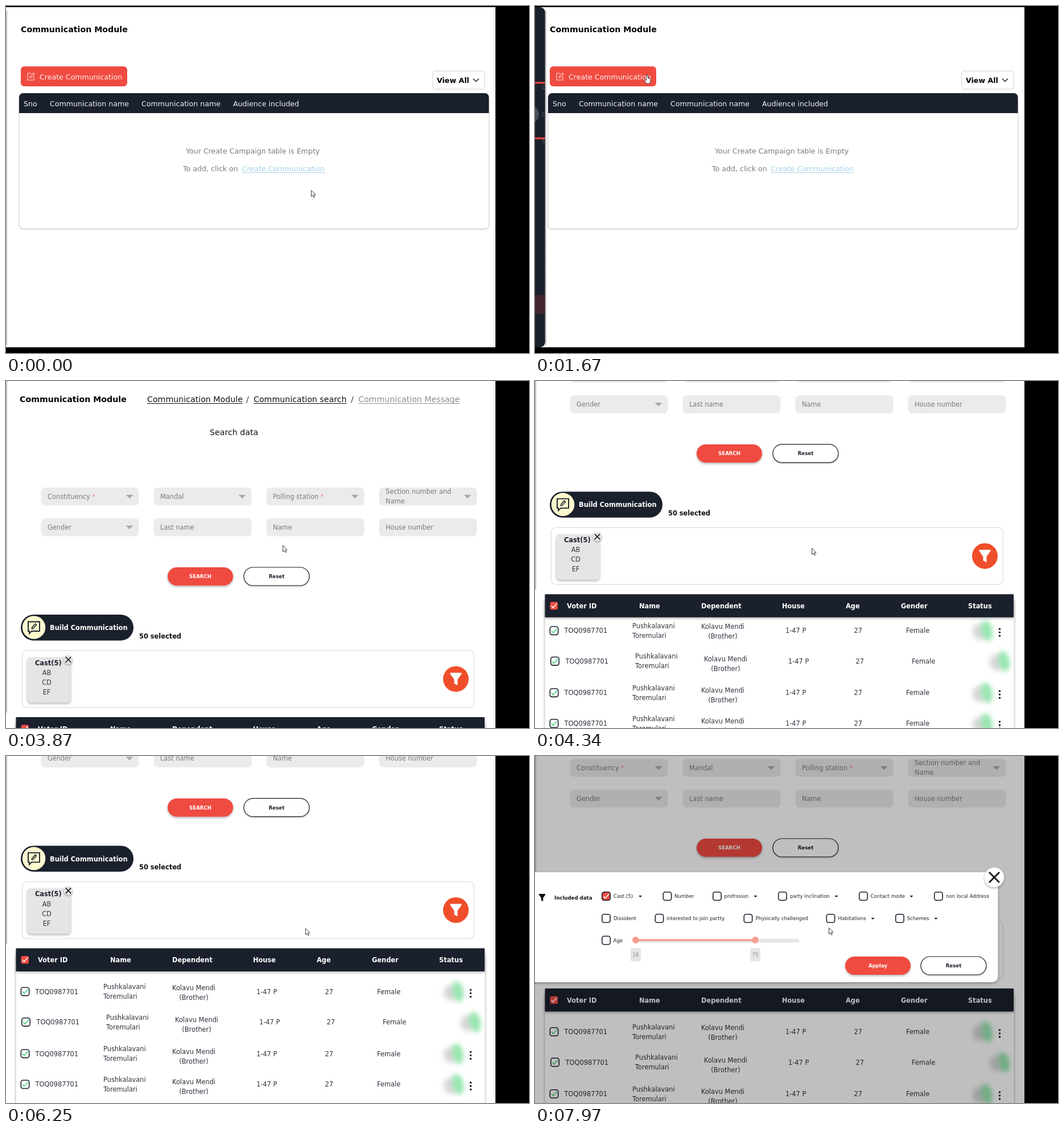
Recreate the animation shown at these times as an HTML page with a canvas. Size 919 by 609 pixels, loop 8 s.

```html
<!DOCTYPE html>
<html lang="en">
<head>
<meta charset="utf-8">
<title>Communication Module</title>
<style>
html, body { margin: 0; width: 100%; height: 100%; overflow: hidden; background: #000; }
canvas { display: block; }
</style>
</head>
<body>
<canvas id="stage" width="919" height="609"></canvas>
<script>
const ctx = document.getElementById('stage').getContext('2d');
const LOOP = 8000, PAGE_W = 860;
const NAVY = '#1a202c', RED = '#f04b41', GRAY = '#7b7b7b', FIELD = '#ebebeb';

// Piecewise linear value: rows of [time, a, b, ...]
function track(keys, t) {
  const i = keys.findIndex(k => k[0] > t);
  if (i === 0) return keys[0].slice(1);
  if (i < 0) return keys[keys.length - 1].slice(1);
  const a = keys[i - 1], b = keys[i], p = (t - a[0]) / (b[0] - a[0]);
  return a.slice(1).map((v, n) => v + (b[n + 1] - v) * p);
}

const sidebarKeys = [[679, 0], [680, 12], [760, 72], [900, 130], [1050, 152], [1200, 159],
  [1509, 159], [1590, 70], [1670, 18], [1750, 6], [1910, 0]];
const scrollKeys = [[4029, 0], [4030, 60], [4269, 60], [4270, 130], [4340, 215], [4560, 400],
  [4780, 540], [5040, 611], [5859, 611], [6000, 470], [6250, 253], [6400, 196], [6500, 182]];
const cursorKeys = [[0, 536, 323], [339, 536, 323], [340, 416, 470], [679, 416, 470],
  [680, 60, 300], [1000, 120, 230], [1430, 150, 180], [1510, 150, 180], [1670, 197, 121],
  [1910, 195, 122], [2729, 195, 122], [2730, 193, 122], [3049, 193, 122], [3050, 188, 122],
  [3390, 188, 122], [3540, 486, 285], [3690, 485, 287], [3870, 486, 288], [4270, 486, 288],
  [4340, 486, 293], [4700, 486, 293], [5040, 467, 372], [5120, 467, 374], [5380, 467, 375],
  [5700, 467, 376], [5860, 467, 376], [6250, 525, 302], [6640, 848, 354], [6710, 848, 354],
  [6950, 770, 360], [7190, 788, 357], [7400, 788, 357], [7800, 525, 304], [7970, 516, 301]];
const modalKeys = [[7340, 0], [7420, .4], [7520, .75], [7640, .95], [7760, 1]];

// y is the middle of the capitals
function text(s, x, y, size, color = '#000', style = '', align = 'left') {
  ctx.font = `${style} ${size}px "DejaVu Sans", Verdana, sans-serif`;
  ctx.textAlign = align;
  ctx.fillStyle = color;
  ctx.fillText(s, x, y + size * .365);
  return ctx.measureText(s).width;
}
function underlined(s, x, y, size, color, style) {
  const w = text(s, x, y, size, color, style);
  ctx.fillRect(x, Math.round(y + size * .5), w, 1);
}
const bold = (s, x, y, size, color, align) => text(s, x, y, size, color, 'bold', align);

function box(x, y, w, h, r, fill, stroke, lw = 1, shadow = 0) {
  ctx.save();
  ctx.beginPath();
  ctx.roundRect(x, y, w, h, r);
  if (shadow) {
    ctx.shadowColor = 'rgba(0,0,0,.3)';
    ctx.shadowBlur = shadow;
    ctx.shadowOffsetY = shadow / 2;
  }
  if (fill) { ctx.fillStyle = fill; ctx.fill(); }
  ctx.shadowColor = 'transparent';
  if (stroke) { ctx.strokeStyle = stroke; ctx.lineWidth = lw; ctx.stroke(); }
  ctx.restore();
}
const disc = (x, y, r, fill, stroke, lw, shadow) =>
  box(x - r, y - r, 2 * r, 2 * r, r, fill, stroke, lw, shadow);

function poly(x, y, pts, color, lw = 0) {
  ctx.beginPath();
  for (let i = 0; i < pts.length; i += 2) ctx.lineTo(x + pts[i], y + pts[i + 1]);
  if (lw) {
    ctx.strokeStyle = color; ctx.lineWidth = lw; ctx.stroke();
  } else {
    ctx.closePath(); ctx.fillStyle = color; ctx.fill();
  }
}
const triangle = (x, y, r, color) => poly(x, y, [-r, -r / 2, r, -r / 2, 0, r / 2], color);
function cross(x, y, r, lw) {
  poly(x, y, [-r, -r, r, r], '#111', lw);
  poly(x, y, [-r, r, r, -r], '#111', lw);
}
const funnel = (x, y, k, color) =>
  poly(x, y, [-10 * k, -11 * k, 10 * k, -11 * k, 10 * k, -9 * k, 3 * k, 1 * k,
    3 * k, 11 * k, -3 * k, 8 * k, -3 * k, 1 * k, -10 * k, -9 * k], color);
const tick = (x, y, color) => poly(x, y, [-4.5, 0, -1.5, 3.5, 5, -4], color, 1.6);

function checkbox(x, y, mark) {
  box(x - 7.2, y - 7.2, 14.4, 14.4, 3.5, mark === 'red' ? RED : '#fff', NAVY, 1.6);
  if (mark) tick(x, y, mark === 'red' ? '#fff' : '#45d67b');
}
function pill(label, x, y, filled) {
  box(x, y, 115, 32, 16, filled ? RED : '#fff', filled ? null : NAVY, 1.2, filled ? 4 : 3);
  bold(label, x + 57.5, y + 16, 8.6, filled ? '#fff' : NAVY, 'center');
}

function edgeShadow(x, top, bottom) {
  const g = ctx.createLinearGradient(x, 0, x + 4, 0);
  g.addColorStop(0, '#a2a2a2');
  g.addColorStop(1, 'rgba(230,230,230,0)');
  ctx.fillStyle = g;
  ctx.fillRect(x, top, 4, bottom - top);
}

function homePage(sidebar) {
  ctx.fillStyle = '#fff';
  ctx.fillRect(0, 2, PAGE_W, 597);
  bold('Communication Module', 26, 41, 14.2);

  box(26, 106, 187, 35, 6, RED);
  poly(37, 117, [7, 1, 1, 1, 1, 13, 12, 13, 12, 7], '#ffd9d5', 1.1);
  poly(37, 117, [5, 9, 5.5, 6.5, 11, .5, 13, 2.5, 7.5, 8.5, 5, 9], '#ffd9d5', 1.1);
  text('Create Communication', 59, 124, 12.6, '#ffeceb');

  box(750, 114, 91, 32, 4, '#fff', '#dedede', 1.3);
  bold('View All', 757, 130, 12.6);
  poly(826, 130, [-5, -2.5, 0, 2.5, 5, -2.5], '#222', 1.5);

  box(23, 153.5, 825.5, 237.5, 7, '#fff', '#dcdcdc', 1.3, 2);
  box(23, 153, 825.5, 35, [7, 7, 0, 0], NAVY);
  ['Sno', 'Communication name', 'Communication name', 'Audience included']
    .forEach((s, i) => text(s, [31, 77, 238, 399][i], 171, 12.6, '#f2f2f2'));
  text('Your Create Campaign table is Empty', 316, 254, 12.6, GRAY);
  text('To add, click on', 311, 285.5, 12.6, GRAY);
  underlined('Create Communication', 414.5, 285.5, 12.6, '#a3d0e4', 'italic');

  if (sidebar > 0) drawSidebar(sidebar);
  edgeShadow(sidebar, 8, 595);
}

function drawSidebar(w) {
  const shift = (w - 18) * .25;
  box(-20, 2, w + 20, 597, 9, NAVY);
  ctx.save();
  ctx.beginPath();
  ctx.rect(0, 2, w, 597);
  ctx.clip();
  ctx.fillStyle = '#432630';
  ctx.fillRect(0, 507, w, 34);
  ctx.fillStyle = '#d8443e';
  ctx.fillRect(0, 133, w, 3.5);
  ctx.fillRect(0, 230.5, w, 3.5);
  disc(-9 + shift, 190, 16, '#4a4f59');
  ['Dashboard', 'Data', 'Search'].forEach((s, i) =>
    text(s, 12 + shift, 143 + 47.5 * i, 9.5, '#555b66'));
  ctx.restore();
}

function field(label, x, y, arrow, required) {
  box(x, y, 172, 31.5, 7, FIELD);
  if (Array.isArray(label)) {
    label.forEach((s, i) => text(s, x + 11.5, y + 7 + 17 * i, 11.4, GRAY));
  } else {
    const w = text(label, x + 11.5, y + 15.5, 11.4, GRAY);
    if (required) text('*', x + 15 + w, y + 15.5, 11.4, '#f08a84');
  }
  if (arrow) triangle(x + 155.5, y + 16, 6.5, '#a9a9a9');
}

function searchForm() {
  bold('Communication Module', 24, 31.5, 14.2);
  underlined('Communication Module', 248, 31.5, 14.2, '#111');
  text('/', 422, 31.5, 14.2, '#333');
  underlined('Communication search', 435, 31.5, 14.2, '#111');
  text('/', 606, 31.5, 14.2, '#333');
  underlined('Communication Message', 619, 31.5, 14.2, '#8c8c8c');
  text('Search data', 358, 90, 14.2, '#111');

  const x = i => 61.5 + 198 * i;
  field('Constituency', x(0), 187, true, true);
  field('Mandal', x(1), 187, true);
  field('Polling station', x(2), 187, true, true);
  field(['Section number and', 'Name'], x(3), 187, true);
  ['Gender', 'Last name', 'Name', 'House number']
    .forEach((s, i) => field(s, x(i), 241, i === 0));
  pill('SEARCH', 284, 327, true);
  pill('Reset', 418, 327, false);

  box(26, 410, 198, 45.5, 22.5, NAVY);
  disc(49, 432.5, 20.3, '#fff9cf');
  poly(49, 432, [-10, -9.5, 10, -9.5, 10, 7, -4, 7, -8, 11, -8, 7, -10, 7, -10, -10.4], NAVY, 1.9);
  poly(49, 431, [-4, 4, -3, 1, 2.5, -5, 4.5, -3, -1, 3, -4, 4], NAVY, 1.5);
  bold('Build Communication', 77, 433, 11.4, '#fff');
  bold('50 selected', 234, 447.5, 11.4, '#111');

  box(28.5, 473, 794, 100, 8, '#fff', '#e3e3e3', 1.5);
  box(37.5, 485, 76, 79.5, 6, '#e5e5e5', null, 1, 4);
  bold('Cast(5)', 51, 494.5, 11.4, NAVY);
  ['AB', 'CD', 'EF'].forEach((s, i) => text(s, 71.5, 512 + 17 * i, 11.4, '#333a45', '', 'center'));
  disc(109.5, 489, 8, '#e4e4e4', null, 1, 3);
  cross(109.5, 489, 4.7, 1.6);
  disc(790.5, 523, 22.5, '#f04e2a');
  funnel(790.5, 523, 1, '#fff');
}

function status(x, y) {
  ctx.save();
  ctx.filter = 'blur(5px)';
  ctx.beginPath();
  ctx.ellipse(x - 3, y + 2, 13, 14, 0, 0, 7);
  ctx.fillStyle = '#d6d6d6';
  ctx.fill();
  ctx.filter = 'blur(4px)';
  ctx.beginPath();
  ctx.ellipse(x + 9, y, 9.5, 18, -.2, 0, 7);
  ctx.fillStyle = '#98e6b0';
  ctx.fill();
  ctx.restore();
}

function voterRow(i, y) {
  const odd = i === 1, ink = '#2d333d', dx = odd ? 5 : 0;
  const cell = (s, x, cy, align) => text(s, x, cy, 11.4, ink, '', align);
  checkbox(odd ? 35 : 33.5, y, 'green');
  cell('TOQ0987701', odd ? 53.5 : 51.5, y);
  cell('Pushkalavani', 171 + dx, y - 8.5);
  cell('Toremulari', 171 + dx, y + 8.5);
  if (i < 5) {
    const top = y - (i ? 4 : 7);
    cell('Kolavu Mendi', 330 + dx, top, 'center');
    cell('(Brother)', 330 + dx, top + 17, 'center');
  } else {
    cell('Kolavu Mendi', 330, y, 'center');
  }
  cell('1-47 P', 440 + dx, y);
  cell('27', odd ? 563.5 : 560.5, y);
  cell('Female', odd ? 662 : 652, y);
  status(odd ? 815 : 785, y);
  if (!odd) for (const d of [-3, 3, 9]) disc(816.5, y + d, 1.7, '#111');
}

function pager(y) {
  text('Items per page', 34, y, 11.5, '#2d333d');
  box(129, y - 15.5, 74, 31, 6, FIELD);
  text('50', 140, y, 11.5, '#222');
  triangle(187.5, y, 6.5, '#999');
  const chevron = (x, d) => poly(x, y, [3 * d, -6, -3 * d, 0, 3 * d, 6], '#111', 1.8);
  chevron(334.5, 1); chevron(340, 1); chevron(359.5, 1);
  chevron(497.5, -1); chevron(517, -1); chevron(522.5, -1);
  for (let i = 0; i < 5; i++) {
    const x = 382.5 + 23 * i;
    disc(x, y, i ? 9 : 8, i ? '#fff' : NAVY, i ? '#dedede' : null);
    text(i + 1, x, y, 8.6, i ? '#333' : '#fff', '', 'center');
  }
  const w = text('1 – 22 of 22 ', 661, y, 8.4, '#333');
  text('viewing', 661 + w, y, 8.4, '#333', 'italic');
}

function voterTable(scroll, inner) {
  box(17, 600, 825, 562, 2, '#fff', '#d4d4d4', 1, 4);
  ctx.save();
  ctx.beginPath();
  ctx.rect(17, 630, 825, 490);
  ctx.clip();
  for (let i = 0; i < 9; i++) {
    const y = 666 - inner + (i < 2 ? 53.5 * i : 109 + 53.85 * (i - 2));
    if (y > scroll - 40 && y < scroll + 650) voterRow(i, y);
  }
  ctx.restore();
  pager(1142.5);
  box(17.5, 590, 823.5, 40.5, 1, NAVY, null, 1, 4);
  box(26.5, 603.5, 13.5, 13.5, 2.5, RED);
  tick(33.2, 610.3, '#fff');
  ['Voter ID', 'Name', 'Dependent', 'House', 'Age', 'Gender', 'Status'].forEach((s, i) =>
    bold(s, [56, 183, 292, 434, 546, 643, 761][i], 610.5, 11.4, '#fff'));
}

function searchPage(t) {
  const [scroll] = track(scrollKeys, t);
  const inner = t >= 4030 && t < 6000 ? 12 : 0;
  ctx.fillStyle = '#fff';
  ctx.fillRect(0, 0, PAGE_W, 609);
  ctx.save();
  ctx.translate(0, -scroll);
  searchForm();
  voterTable(scroll, inner);
  edgeShadow(0, 0, 582);
  ctx.restore();
}

function option(label, x, y, labelX, arrowX, mark) {
  checkbox(x, y, mark);
  text(label, labelX, y, 8.6, '#222');
  if (arrowX) triangle(arrowX, y + .5, 3, '#111');
}

function filterModal(p) {
  ctx.fillStyle = `rgba(0,0,0,${.25 * p})`;
  ctx.fillRect(0, 0, PAGE_W, 609);
  ctx.save();
  ctx.translate((p - 1) * 830, 0);
  box(-20, 204, 833.5, 193, 10, '#fff', null, 1, 4);
  disc(807, 213, 17.3, '#fff', null, 1, 4);
  cross(807, 213, 9, 2.6);
  funnel(12.5, 248.5, .58, '#111');
  bold('Included data', 34, 248.5, 8.6, '#111');

  option('Cast (5)', 125, 246, 138, 185, 'red');
  option('Number', 232.5, 246, 245);
  option('profrssion', 320, 246, 332.5, 387.5);
  option('party inclination', 435, 246, 448, 529.5);
  option('Contact mode', 577, 246, 589.5, 661.5);
  option('non local Address', 709, 246, 722);
  option('Dissident', 125, 285, 138);
  option('interested to join partty', 218.5, 285, 231);
  option('Physically challenged', 374.5, 285, 387.5);
  option('Habitations', 519.5, 285, 532.5, 593.5);
  option('Schemes', 641, 285, 653.5, 704.5);
  option('Age', 125, 323.5, 137.5);

  box(177, 321, 287, 6.5, 2, '#e6e6e6');
  box(177, 321.5, 210, 3.6, 1, '#f9a195');
  [[177, '18'], [387, '75']].forEach(([x, s]) => {
    disc(x, 323, 6, '#f9a092');
    box(x - 9, 337, 18, 23.5, 3, '#e6e6e6');
    text(s, x, 349, 8.6, '#8a8a8a', '', 'center');
  });
  pill('Applay', 545, 352, true);
  pill('Reset', 678, 352, false);
  ctx.restore();
}

function pointer(t) {
  if (t >= 410 && t < 680) return;
  const [x, y] = track(cursorKeys, t);
  const hand = (t >= 1590 && t < 3050) || (t >= 6900 && t < 7400);
  const shape = hand
    ? [-1, 0, 1, 0, 1.6, 5.5, 5.5, 6.5, 6.2, 8, 5.5, 12, 4.5, 15, -1.5, 15, -4.8, 9.5, -4, 8, -1.6, 9.5]
    : [.5, .5, .5, 11.5, 3, 9.2, 5, 13, 6.6, 12.2, 4.8, 8.5, 8, 8.2];
  poly(x, y, shape, '#fff');
  poly(x, y, shape.concat(shape.slice(0, 2)), '#3a3d48', 1);
}

function draw(t) {
  ctx.fillStyle = '#000';
  ctx.fillRect(0, 0, 919, 609);
  ctx.save();
  ctx.beginPath();
  ctx.rect(0, 0, PAGE_W, 609);
  ctx.clip();
  if (t < 3050) homePage(track(sidebarKeys, t)[0]);
  else searchPage(t);
  const [open] = track(modalKeys, t);
  if (open > 0) filterModal(open);
  pointer(t);
  ctx.restore();
}

function tickFrame() {
  draw(performance.now() % LOOP);
  requestAnimationFrame(tickFrame);
}
tickFrame();
</script>
</body>
</html>
```
